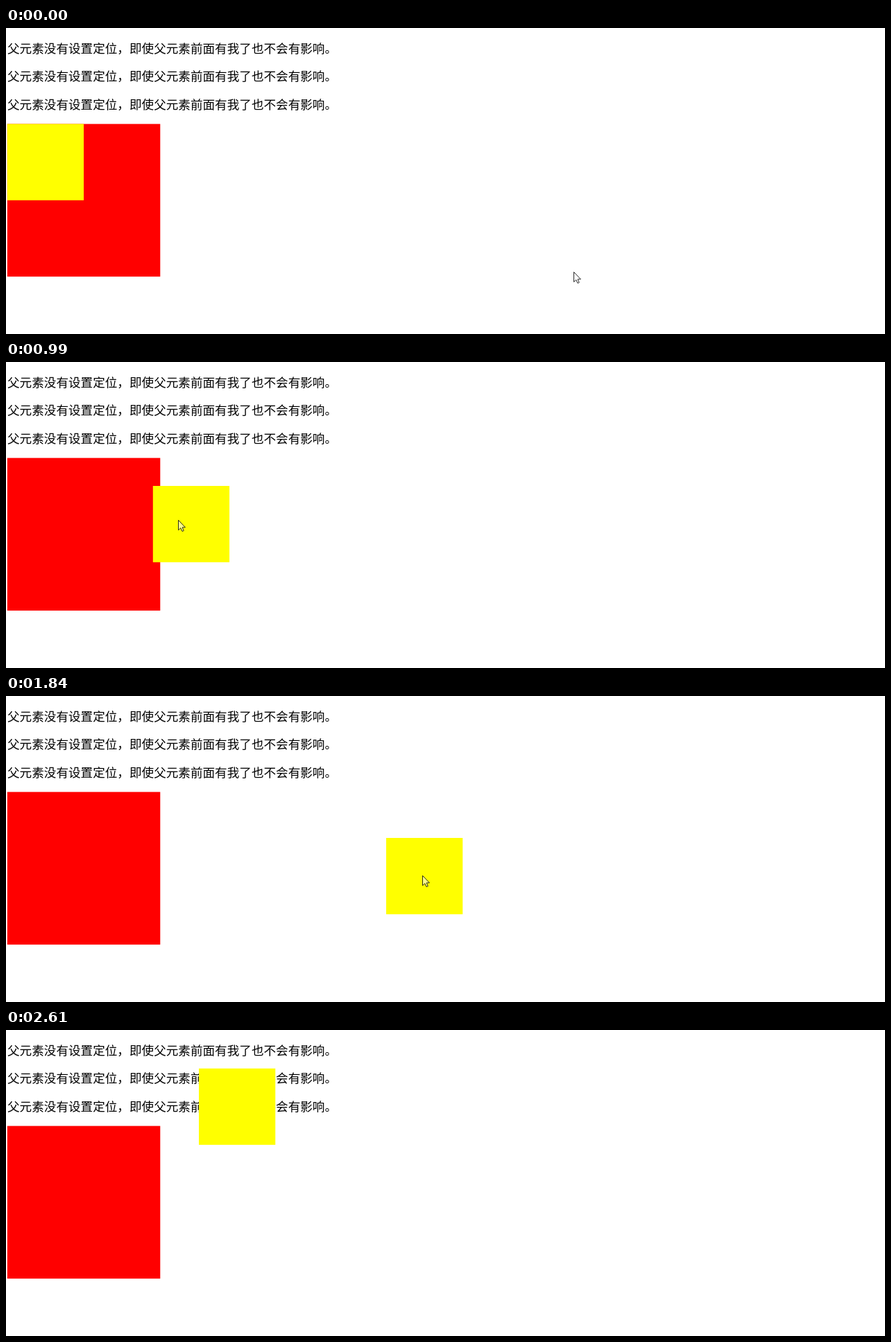
Write an HTML page that moves like this. It is 1267x442 px and loops after 3270 ms.

```html
<!DOCTYPE html>
<html lang="zh-CN">
<head>
<meta charset="utf-8">
<style>
  html, body { margin: 0; width: 100%; height: 100%; overflow: hidden; background: #fff; }
  svg { display: block; }
  text { font: 350 17.6px "Noto Sans CJK SC", "Noto Sans CJK", sans-serif; }
</style>
</head>
<body>
<svg width="1267" height="442" viewBox="0 0 1267 442">
  <g id="lines"></g>
  <rect x="1.8" y="138.6" width="220.5" height="220.5" fill="#f00"/>
  <rect id="box" width="110.25" height="110.25" fill="#ff0"/>
  <path id="pointer" d="M.5.5V14.8L3.8 11.8 6 16.6 8.2 15.6 6.1 10.9H10.4Z"
    fill="#fff" fill-opacity=".55" stroke="#111" stroke-width=".9"/>
</svg>
<script>
const LOOP = 3270, TICK = 108.8;
const GRAB = 56, LEAD = 0.25;        // pointer's hold on the box, and how far ahead it runs
const PRESS = 5, RELEASE = 22;       // ticks between which the box is dragged
const $ = id => document.getElementById(id);
const SVG = 'http://www.w3.org/2000/svg';

for (let i = 0; i < 3; i++) {
  const line = document.createElementNS(SVG, 'text');
  line.setAttribute('x', 2);
  line.setAttribute('y', 36 + i * 40.4);
  line.textContent = '父元素没有设置定位，即使父元素前面有我了也不会有影响。';
  $('lines').append(line);
}

// Turning points of the drag: tick, x, y
const turns = [
  [PRESS, 1.8, 138.6], [7, 198.6, 78.6], [8, 265, 118], [9, 211.8, 179],
  [10, 88, 132], [11, 22, 71], [12, 132.2, 87.4], [15, 283, 100],
  [17, 548, 205], [20, 345, 87.4], [21, 207, 82], [RELEASE, 278, 55.6]
];

const ease = u => u * u * (3 - 2 * u);
const mix = (a, b, u) => a.map((v, i) => v + (b[i] - v) * u);

function dragAt(tick) {
  const t = Math.min(Math.max(tick, PRESS), RELEASE);
  const i = Math.max(1, turns.findIndex(turn => turn[0] >= t));
  const [from, ...a] = turns[i - 1], [to, ...b] = turns[i];
  return mix(a, b, ease((t - from) / (to - from)));
}

function pointerAt(tick) {
  if (tick <= PRESS) return mix([818, 352], [65, 153], ease(tick / PRESS));
  if (tick <= RELEASE) return dragAt(tick + LEAD).map(v => Math.round(v + GRAB));
  return mix([795, 329], [820, 460], tick - RELEASE - 1);   // out through the bottom edge
}

const place = (el, [x, y]) => el.setAttribute('transform', `translate(${x} ${y})`);

const start = performance.now();
function draw() {
  const time = (performance.now() - start) % LOOP;
  const tick = Math.floor((time + 10) / TICK);   // motion is held between ticks
  place($('box'), dragAt(tick));
  place($('pointer'), pointerAt(tick));
  requestAnimationFrame(draw);
}
draw();
</script>
</body>
</html>
```
